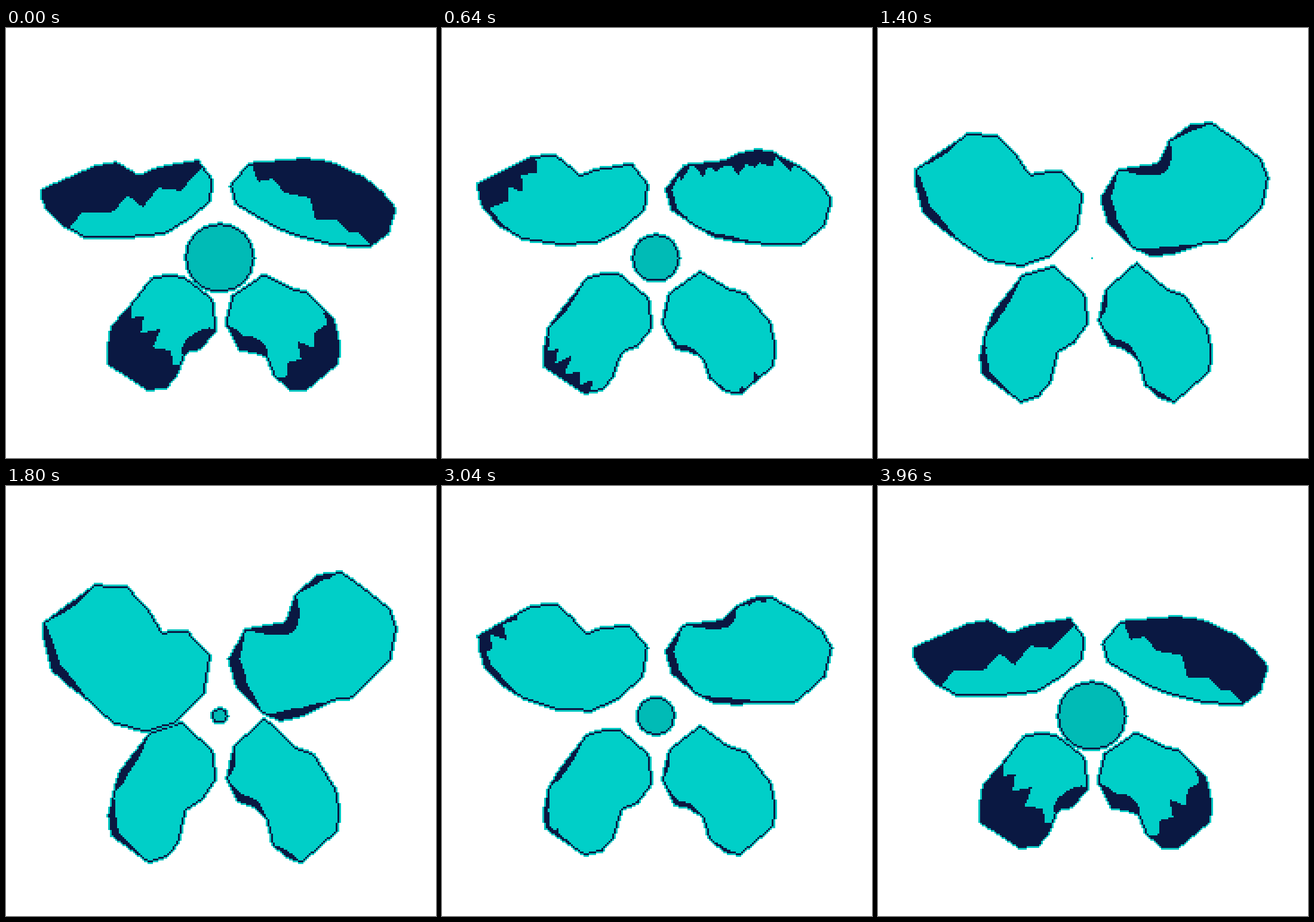
These frames come from a looping animation (720 px wide and 720 px high, 4000 ms). An HTML page with a canvas:

```html
<!DOCTYPE html>
<html lang="en">
<head>
<meta charset="utf-8">
<title>Flower to butterfly</title>
<style>
html, body { margin: 0; width: 100%; height: 100%; overflow: hidden; background: #fff; }
canvas { display: block; width: 100%; height: 100%; image-rendering: pixelated; }
</style>
</head>
<body>
<canvas id="stage" width="240" height="240"></canvas>
<script>
const SIZE = 240, LOOP = 4000, STEP = 40;
const RIM = [0, 200, 194], NAVY = [10, 24, 66], TEAL = [0, 207, 200], CORE = [0, 187, 182];

// closed, open: outline corners at both ends of the flap.
// shadow: line with the dark side on its left, at rest and once the wing has lifted.
// rims: dark crescents along the outline: first corner, last corner, depth closed, depth open.
const wings = [
  { // lower left
    closed: '176,500 205,468 244,418 272,412 298,416 347,455 353,505 326,538 302,543 287,580 268,603 238,607 169,562 169,540',
    open: '180,512 190,478 242,411 270,403 293,394 347,443 353,490 330,524 302,543 290,598 268,622 240,632 176,585 171,552',
    shadow: '300,570 205,470 245,600 172,535',
    rims: [[0, 2, 3, 14], [11, 14, 0, 13], [6, 8, 26, 0]]
  },
  { // lower right
    closed: '367,495 378,448 432,412 475,434 505,442 550,488 560,532 556,562 502,607 478,607 448,582 435,550 413,543 392,541',
    open: '369,490 381,436 433,388 484,436 516,449 554,510 560,545 556,578 494,633 470,622 445,600 436,557 414,537 388,528',
    shadow: '548,478 455,585 590,560 480,620',
    rims: [[11, 14, 26, 13], [14, 15, 0, 9], [8, 10, 0, 8]]
  },
  { // upper left
    closed: '58,271 150,231 185,225 203,236 222,247 255,233 322,221 347,255 343,290 310,318 265,346 198,352 135,353 95,332 66,300 61,290',
    open: '63,228 150,163 202,166 240,207 263,245 275,243 303,243 343,286 332,349 280,401 234,414 180,400 140,362 105,334 76,308 62,250',
    shadow: '95,335 350,240 75,325 160,205',
    rims: [[12, 16, 0, 16], [0, 1, 0, 8]]
  },
  { // upper right
    closed: '375,264 407,226 475,220 500,219 525,221 545,225 600,250 630,275 653,303 640,345 608,367 550,365 490,350 455,337 425,319 384,295',
    open: '372,291 401,239 468,229 484,181 522,147 562,141 602,171 645,205 655,237 645,289 575,357 545,360 500,385 460,395 430,383 385,336',
    shadow: '415,240 612,362 430,240 540,218',
    rims: [[14, 17, 0, 20], [11, 14, 0, 15], [1, 3, 0, 20], [3, 5, 0, 10]]
  }
];

const points = s => s.split(' ').map(p => p.split(',').map(Number));
for (const w of wings) for (const key of ['closed', 'open', 'shadow']) w[key] = points(w[key]);

const stage = document.getElementById('stage').getContext('2d');
const maskCanvas = document.createElement('canvas');
maskCanvas.width = maskCanvas.height = SIZE;
const mask = maskCanvas.getContext('2d', { willReadFrequently: true });
const picture = stage.createImageData(SIZE, SIZE);
const layer = new Uint8Array(SIZE * SIZE);

const mix = ([ax, ay], [bx, by], k) => [ax + (bx - ax) * k, ay + (by - ay) * k];
const ease = x => (1 - Math.cos(Math.PI * x)) / 2;

function random(seed) {
  return () => (seed = seed * 16807 % 2147483647) / 2147483647;
}

function fill(poly, color) {
  mask.fillStyle = color;
  mask.beginPath();
  poly.forEach(([x, y]) => mask.lineTo(x, y));
  mask.closePath();
  mask.fill();
}

// Everything beyond a jagged line; the line turns with the wing, then slides off it.
function drawShadow([a, b, c, d], open, seed) {
  const k = Math.min(1, open * 4), lift = Math.max(0, open - 0.25) * 120;
  const from = mix(a, c, k), to = mix(b, d, k);
  const dx = to[0] - from[0], dy = to[1] - from[1], len = Math.hypot(dx, dy);
  const rand = random(seed);
  const at = (s, out) => {
    const [x, y] = mix(from, to, s);
    return [x + dy / len * out, y - dx / len * out];
  };
  const poly = [];
  for (let i = 0; i <= 16; i++) {
    const side = i % 2 ? 1 : -1;
    poly.push(at(i / 8 - 0.5 + 0.08 * rand(), lift + side * (3 + 13 * rand())));
  }
  fill([...poly, at(2, 400), at(-1, 400)], '#ff0');
}

function drawRim(poly, [first, last, closed, opened], open) {
  const depth = closed * Math.max(0, 1 - open * 4) + opened * Math.sqrt(open);
  const steps = 16 * (last - first);
  mask.fillStyle = '#ff0';
  for (let i = 1; i < steps; i++) {
    const n = first + Math.floor(i / 16);
    const [x, y] = mix(poly[n % poly.length], poly[(n + 1) % poly.length], i % 16 / 16);
    mask.beginPath();
    mask.arc(x, y, depth * Math.sin(Math.PI * i / steps), 0, 7);
    mask.fill();
  }
}

// Mask channels: alpha is the silhouette, green the dark parts.
function drawPart(poly, color, drawDark) {
  mask.setTransform(1, 0, 0, 1, 0, 0);
  mask.clearRect(0, 0, SIZE, SIZE);
  mask.scale(1 / 3, 1 / 3);
  fill(poly, '#f00');
  if (drawDark) {
    mask.strokeStyle = '#f00';
    mask.lineWidth = 4;
    mask.stroke();
    mask.globalCompositeOperation = 'source-atop';
    drawDark();
    mask.globalCompositeOperation = 'source-over';
  }
  paint(mask.getImageData(0, 0, SIZE, SIZE).data, color);
}

// Outermost pixels become the rim, the next ones the navy line.
function paint(data, color) {
  const touches = (i, level) => layer[i - 1] === level || layer[i + 1] === level ||
    layer[i - SIZE] === level || layer[i + SIZE] === level;
  for (let i = 0; i < layer.length; i++) layer[i] = data[i * 4 + 3] > 127 ? 3 : 0;
  for (let ring = 1; ring < 3; ring++) {
    for (let i = 0; i < layer.length; i++) {
      if (layer[i] === 3 && touches(i, ring - 1)) layer[i] = ring;
    }
  }
  for (let i = 0; i < layer.length; i++) {
    if (!layer[i]) continue;
    const dark = layer[i] === 2 || data[i * 4 + 1] > 127;
    const rgb = layer[i] === 1 ? RIM : dark ? NAVY : color;
    for (let c = 0; c < 3; c++) picture.data[i * 4 + c] = rgb[c];
  }
}

// The disc shrinks through zero and returns a little faster than the wings.
function discRadius(x) {
  const back = x - 1;
  const fall = x < 1 ? ease(x) : 1 - ease(back + 0.36 * back * (1 - back));
  return Math.abs(60.5 - 78 * fall);
}

function disc(r) {
  return Array.from({ length: 16 }, (_, i) => {
    const a = i * Math.PI / 8;
    return [358 + r * Math.cos(a), 385 + r * Math.sin(a)];
  });
}

function render(t) {
  const x = t / (LOOP / 2), open = ease(x);
  picture.data.fill(255);
  wings.forEach((w, i) => {
    const poly = w.closed.map((p, n) => mix(p, w.open[n], open));
    drawPart(poly, TEAL, () => {
      drawShadow(w.shadow, open, 4021 * (i + 1));
      w.rims.forEach(r => drawRim(poly, r, open));
    });
  });
  drawPart(disc(discRadius(x)), CORE);
  stage.putImageData(picture, 0, 0);
}

const start = performance.now();
let shown = -1;
function tick() {
  const t = Math.floor((performance.now() - start) % LOOP / STEP) * STEP;
  if (t !== shown) render(shown = t);
  requestAnimationFrame(tick);
}
tick();
</script>
</body>
</html>
```
